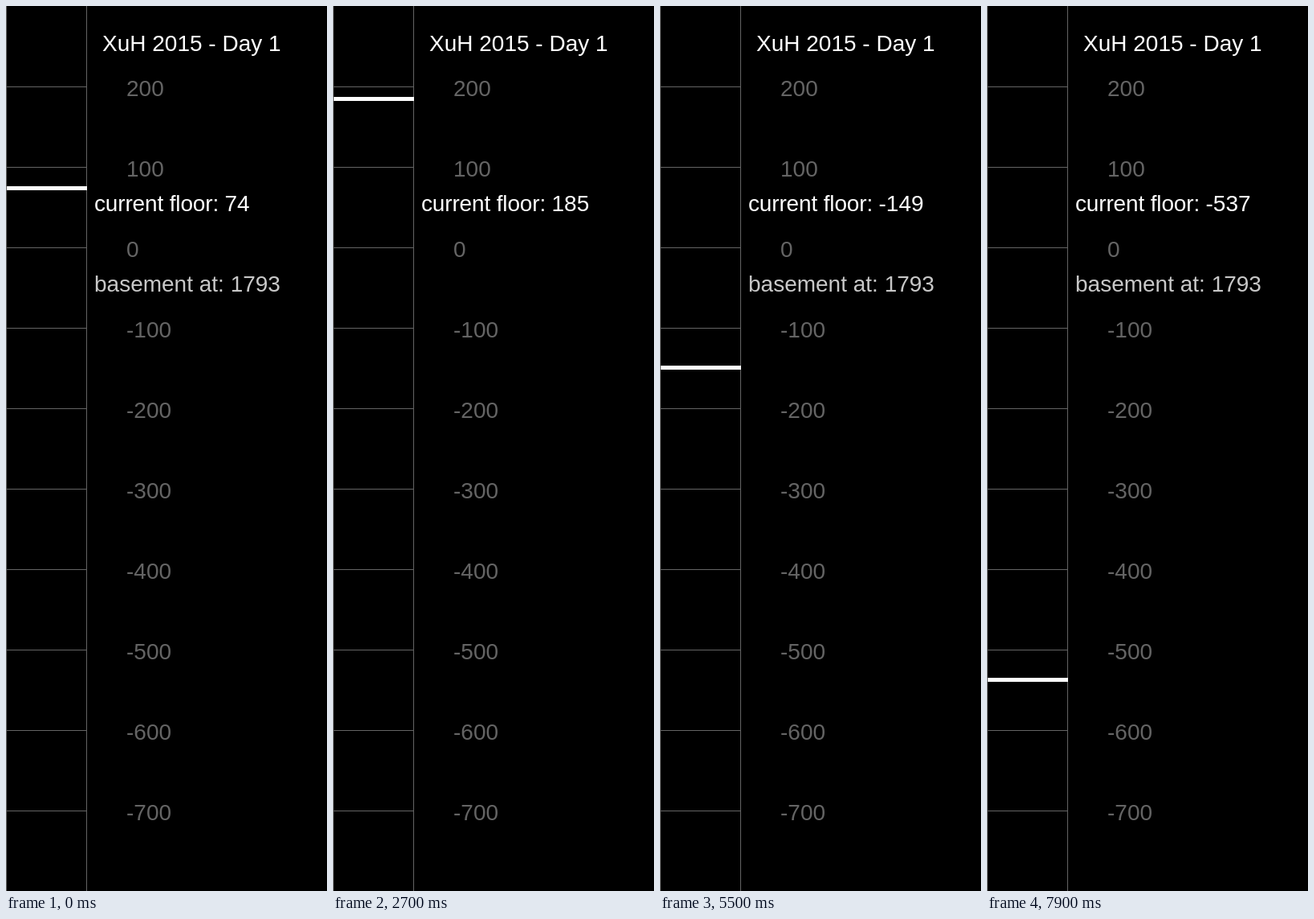
Animation of 400 by 1100 pixels, one loop 8000 ms. Source, as an HTML page:

```html
<!DOCTYPE html>
<html lang="en">
<head>
<meta charset="utf-8">
<title>Floor counter</title>
<style>
  html, body { margin: 0; width: 100%; height: 100%; overflow: hidden; background: #000; }
  svg { display: block; width: 100vw; height: 100vh; }
  text { font: 28px "Liberation Sans", Arial, sans-serif; fill: #fff; white-space: pre; }
  .grid { stroke: #646464; shape-rendering: crispEdges; }
  .mark { fill: #646464; }
  .label { letter-spacing: -0.15px; }
  #basement { fill: #c8c8c8; }
</style>
</head>
<body>
<svg viewBox="0 0 400 1100">
  <rect width="400" height="1100" fill="#000"/>
  <g id="scale"></g>
  <rect id="bar" x="1" width="100" height="5" fill="#fff" shape-rendering="crispEdges"/>
  <text x="120" y="56">XuH 2015 - Day 1</text>
  <text class="label" x="110" y="255">current floor:</text>
  <text id="floor" x="272.5" y="255"></text>
  <text id="basement" x="110" y="355">basement at: 1793</text>
</svg>
<script>
const LOOP = 8000, STEP = 100, ZERO_Y = 300, BASEMENT_STEP = 46;
const $ = id => document.getElementById(id);

// [step, floor] along the walk
const walk = [
  [1, 1], [9, 75], [16, 143], [18, 153], [27, 185], [30, 195], [36, 125],
  [40, 87], [45, 27], [46, -3], [54, -135], [55, -149], [63, -301],
  [69, -393], [72, -455], [79, -537]
];

function add(tag, attrs, content = "") {
  const el = document.createElementNS("http://www.w3.org/2000/svg", tag);
  for (const key in attrs) el.setAttribute(key, attrs[key]);
  el.textContent = content;
  $("scale").append(el);
}

function line(x1, y1, x2, y2) {
  add("line", { x1, y1, x2, y2, class: "grid" });
}

for (const x of [0.5, 100.5]) line(x, 0, x, 1100);
for (let y = 100; y <= 1000; y += 100) {
  line(0, y + 0.5, 100, y + 0.5);
  add("text", { x: 150, y: y + 12, class: "mark" }, ZERO_Y - y);
}

function floorAt(step) {
  if (step === 0) return 74; // result of the finished walk
  const i = Math.max(1, walk.findIndex(([s]) => s >= step));
  const [s0, a] = walk[i - 1], [s1, b] = walk[i];
  const value = a + (b - a) * (step - s0) / (s1 - s0);
  return 2 * Math.round((value - 1) / 2) + 1; // an even number of moves per step keeps it odd
}

function draw(time) {
  const step = Math.floor((time % LOOP) / STEP);
  const floor = floorAt(step);
  $("bar").setAttribute("y", ZERO_Y - floor - 2);
  $("floor").textContent = floor;
  $("basement").style.display = step === 0 || step >= BASEMENT_STEP ? "" : "none";
}

const start = performance.now();
function tick() {
  draw(performance.now() - start);
  requestAnimationFrame(tick);
}
tick();
</script>
</body>
</html>
```
